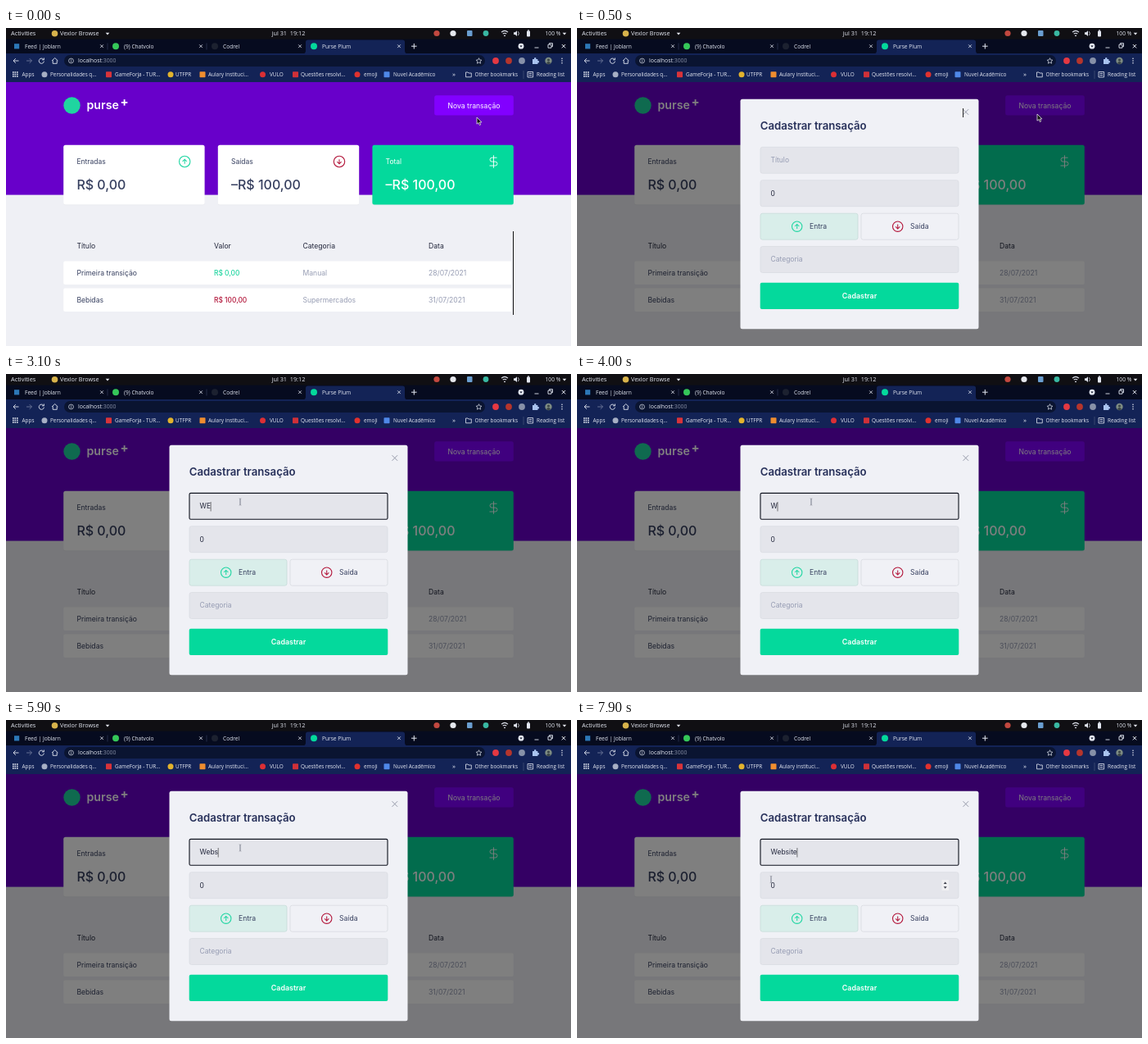
Animation, 690 px wide and 388 px high, one loop 8 s. Source, as an HTML page:

```html
<!DOCTYPE html>
<html lang="pt">
<head>
<meta charset="utf-8">
<title>Purse Plum</title>
<style>
html, body { margin: 0; width: 100%; height: 100%; overflow: hidden; background: #eff0f5; }
svg { display: block; width: 690px; height: 388px; }
text { white-space: pre; }
.ui { font-family: "Open Sans", "Noto Sans", sans-serif; }
.app { font-family: Inter, "Open Sans", sans-serif; }
</style>
</head>
<body>
<svg id="stage" viewBox="0 0 690 388" xmlns="http://www.w3.org/2000/svg"></svg>
<script>
const LOOP = 8000;
const INK = '#363f5f', DARK = '#22263b', MUTED = '#969cb3', GREEN = '#04d99c', RED = '#b3173b';
const LIGHT = '#e4e8f2', NAVY = '#132356', STRIP = '#060b1f';

const attrs = o => Object.entries(o).map(([k, v]) => ` ${k}="${v}"`).join('');
const rect = (x, y, w, h, fill, o = {}) =>
  `<rect x="${x}" y="${y}" width="${w}" height="${h}" fill="${fill}"${attrs(o)}/>`;
const circle = (x, y, r, fill, o = {}) => `<circle cx="${x}" cy="${y}" r="${r}" fill="${fill}"${attrs(o)}/>`;
const line = (d, stroke, width = 1, o = {}) =>
  `<path d="${d}" fill="none" stroke="${stroke}" stroke-width="${width}"${attrs(o)}/>`;
const shape = (d, fill, o = {}) => `<path d="${d}" fill="${fill}"${attrs(o)}/>`;
const text = (x, y, s, size, fill, o = {}) =>
  `<text x="${x}" y="${y}" font-size="${size}" fill="${fill}"${attrs(o)}>${s}</text>`;
const group = (body, o = {}) => `<g${attrs(o)}>${body}</g>`;
const cross = (x, y, r, color, width = 0.8) =>
  line(`M${x - r} ${y - r}l${2 * r} ${2 * r}m0 ${-2 * r}l${-2 * r} ${2 * r}`, color, width);
const dropdown = (x, y) => shape(`M${x - 2.3} ${y - 1}h4.6l-2.3 2.8z`, LIGHT);

function arrowIcon(x, y, up, r = 6.7) {
  const s = up ? -1 : 1, color = up ? '#22d6a3' : RED;
  return circle(x, y, r, 'none', { stroke: color, 'stroke-width': 1.1 }) +
    line(`M${x} ${y - 2.8 * s}v${5.6 * s}m-2.6 ${-2.6 * s}l2.6 ${2.6 * s}l2.6 ${-2.6 * s}`, color, 1.05);
}

function systemBar() {
  return rect(0, 0, 690, 14, '#100f13') +
    text(6, 9.3, 'Activities', 7.4, LIGHT) +
    circle(59.5, 6.7, 3.8, '#d8b34b') +
    text(66, 9.3, 'Vexlor Browse', 7.2, LIGHT) + dropdown(124, 6.7) +
    text(345, 9.3, 'jul 31&#160; 19:12', 7.3, LIGHT, { 'text-anchor': 'middle' }) +
    circle(526, 6.5, 3.6, '#c2483f') + circle(546, 6.5, 3.6, '#e6e8ee') +
    rect(563, 3, 6.5, 7, '#6a9ed0', { rx: 1 }) + circle(586, 6.5, 3.4, '#39b8a2') +
    line('M605 5.2q4-3.6 8 0M606.7 7.2q2.3-2 4.6 0', LIGHT, 1.1) + circle(609, 9.3, 0.9, LIGHT) +
    shape('M620 5.3h1.8l2.2-2v6.8l-2.2-2H620z', LIGHT) + line('M625.4 4.3q2 2.4 0 4.8', LIGHT, 0.8) +
    rect(636, 3.5, 4, 7, LIGHT, { rx: 0.8 }) + rect(637, 2.4, 2, 1.2, LIGHT) +
    text(658.5, 9.2, '100 %', 6.7, LIGHT) + dropdown(682, 6.7);
}

function tabStrip() {
  const tabs = [
    ['Feed | Joblarn', '#2c78b7'], ['(9) Chatvolo', '#35c759'],
    ['Codrel', '#1c2130'], ['Purse Plum', GREEN]
  ];
  return rect(0, 13.6, 690, 18, STRIP) +
    shape('M363 31.2q3 0 3-4V17q0-2.5 3-2.5h115q3 0 3 2.5v10.2q0 4 3 4z', NAVY) +
    tabs.map(([name, color], i) => {
      const x = 13 + 121 * i;
      return (i ? circle(x, 22.2, 4, color) : rect(x - 3, 19.2, 6.2, 6.2, color)) +
        text(x + 10, 24.6, name, 6.6, LIGHT) + cross(x + 104, 22.2, 1.9, LIGHT);
    }).join('') +
    line('M124 18.5v8M245 18.5v8', '#3a4566', 0.6) +
    line('M495 22.2h6.6m-3.3-3.3v6.6', LIGHT, 1) +
    circle(629, 22.2, 3.4, LIGHT) + shape('M627.4 21.4h3.2l-1.6 2z', STRIP) +
    line('M645.5 24h5M662 20.2h4v4h-4zM663.5 20v-1.4h4v4H666', LIGHT, 0.9) + cross(681, 22.2, 2.2, LIGHT, 1);
}

function toolbar() {
  const plain = [[598, '#e53842'], [614, '#b5352c'], [630, '#8791a8']];
  return rect(0, 31, 690, 35.5, NAVY) +
    line('M15.5 40h-6.5m2.8-2.8l-2.8 2.8l2.8 2.8', LIGHT, 0.9) +
    line('M25 40h6.5m-2.8-2.8l2.8 2.8l-2.8 2.8', '#6f7a9a', 0.9) +
    line('M45.7 38.2a3.1 3.1 0 1 0 .7 2.4M46.4 36.5v2.3h-2.4', LIGHT, 0.9) +
    line('M56 40l3.7-3.4l3.7 3.4M57.2 39.5v3.8h5v-3.8', LIGHT, 0.9) +
    rect(71, 33, 514, 14.1, '#0a1431', { rx: 7 }) +
    circle(79.5, 40, 2.9, 'none', { stroke: LIGHT, 'stroke-width': 0.7 }) +
    line('M79.5 39.4v2.2M79.5 38v.7', LIGHT, 0.7) +
    text(88, 42.4, 'localhost<tspan fill="#8991a8">:3000</tspan>', 6.9, LIGHT) +
    line('M577.5 36.7l1 2.2 2.4.3-1.8 1.6.5 2.4-2.1-1.2-2.1 1.2.5-2.4-1.8-1.6 2.4-.3z', LIGHT, 0.7) +
    plain.map(([x, c]) => circle(x, 40, 3.9, c)).join('') +
    shape('M643 38h2q-.4-2 1.2-2t1.2 2h2v2q1.7-.3 1.7 1.2t-1.7 1.2v1.6H643z', '#a9c3ef') +
    circle(662.5, 40, 4.2, '#7d8b82') + shape('M659.8 43.1q2.7-4 5.4 0-2.7 2.1-5.4 0z', '#3b4546') +
    circle(662.5, 39, 1.5, '#3b4546') +
    [37.3, 40, 42.7].map(y => circle(679, y, 0.8, LIGHT)).join('');
}

function bookmarks() {
  const items = [
    [47, 54, 'Personalidades q...', '#a6afc4'], [125.5, 133, 'GameForja - TUR...', '#d8333a'],
    [201, 207, 'UTFPR', '#e2b32d'], [240, 247, 'Aulary instituci...', '#ef8d2f'],
    [313.5, 322, 'VULO', '#dc2f35'], [353.5, 360, 'Questões resolvi...', '#cf3038'],
    [429, 437, 'emoji', '#e0312e'], [465, 473, 'Nuvel Acadêmico', '#4f88e8']
  ];
  let grid = '';
  for (let i = 0; i < 9; i++) grid += rect(8 + i % 3 * 2.5, 53.2 + Math.floor(i / 3) * 2.5, 1.6, 1.6, LIGHT);
  return grid + text(19.5, 59.3, 'Apps', 6.4, LIGHT) +
    items.map(([x, tx, s, c], i) => (i % 2 ? rect(x - 3.5, 53.2, 7, 7, c, { rx: 0.8 }) : circle(x, 56.7, 3.5, c)) +
      text(tx, 59.3, s, 6.4, LIGHT)).join('') +
    text(545, 59.3, '»', 8, LIGHT) +
    line('M561.5 54h2.5l1 1h3.3v4.8h-6.8z', LIGHT, 0.8) + text(572.5, 59.3, 'Other bookmarks', 6.4, LIGHT) +
    line('M632 52v10', '#526080', 0.6) +
    line('M637 53.5h6.6v6.5H637zM638.4 55.5h3.8m-3.8 2.2h3.8', LIGHT, 0.8) +
    text(648, 59.3, 'Reading list', 6.4, LIGHT);
}

function card(x, label, amount, accent) {
  const ink = accent ? '#fff' : INK;
  return rect(x, 143.2, 172.4, 73, '#000', { rx: 2.5, opacity: 0.04 }) +
    rect(x, 142.8, 172.4, 72.7, accent ? GREEN : '#fff', { rx: 2.5 }) +
    text(x + 16.2, 166, label, 8.5, ink) +
    text(x + 16.2, 197, amount, 16, ink, { 'font-weight': 500 });
}

function tableRow(y, title, amount, color, category, date) {
  return rect(70.2, y, 549.6, 28.5, '#fff', { rx: 2 }) +
    text(86.4, y + 17, title, 8.6, INK) +
    text(254, y + 17, amount, 8.4, color, { 'font-weight': 500 }) +
    text(362.5, y + 17, category, 8.6, MUTED) + text(516, y + 17, date, 8.6, MUTED);
}

function page() {
  const heads = [[86.4, 'Título'], [254, 'Valor'], [362.5, 'Categoria'], [516, 'Data']];
  return rect(0, 66, 690, 322, '#eff0f5') + rect(0, 66, 690, 137.6, '#6800ca') +
    circle(80.5, 94.5, 10.2, '#1fd5a0') +
    text(98.5, 98.7, 'purse', 14.2, '#fff', { 'font-weight': 600 }) +
    text(139.5, 94.7, '+', 15, '#fff', { 'font-weight': 700 }) +
    rect(523.2, 82.3, 96.6, 24.2, '#8200ff', { rx: 2.5, id: 'newButton' }) +
    text(571.5, 97.6, 'Nova transação', 8.6, '#fff', { 'text-anchor': 'middle' }) +
    card(70.2, 'Entradas', 'R$ 0,00') + arrowIcon(218.2, 163, true) +
    card(258.8, 'Saídas', '–R$ 100,00') + arrowIcon(407, 163, false) +
    card(447.4, 'Total', '–R$ 100,00', true) +
    line('M595.5 155.3v15.5M599.5 158.2h-6a2.4 2.4 0 0 0 0 4.9h4a2.4 2.4 0 0 1 0 4.9h-7', '#fff', 1, { opacity: 0.9 }) +
    heads.map(([x, s]) => text(x, 269, s, 8.6, DARK)).join('') +
    tableRow(284.5, 'Primeira transição', 'R$ 0,00', '#1fd5a0', 'Manual', '28/07/2021') +
    tableRow(317.5, 'Bebidas', 'R$ 100,00', RED, 'Supermercados', '31/07/2021') +
    group(rect(617, 248, 3, 102, '#eff0f5') + line('M619.5 248v102', '#111', 1), { id: 'edge' });
}

function modal() {
  const field = (y, label, color, id) =>
    rect(224, y, 242, 32, '#e4e5eb', { rx: 2.5, stroke: '#d5d7dd', 'stroke-width': 0.6 }) +
    text(236.5, y + 18.9, label, 8.5, color, { id });
  const choice = (x, label, up) =>
    rect(x, 226.2, 119, 32, up ? '#d9eeea' : 'none', { rx: 2.5, stroke: up ? '#c3d9d6' : '#d5d7dd', 'stroke-width': 0.7 }) +
    arrowIcon(x + 44.7, 242.2, up, 6.2) + text(x + 60, 245.2, label, 8.6, INK);
  return rect(0, 66, 690, 322, '#000', { opacity: 0.5 }) +
    rect(199.5, 86.8, 291, 280.5, '#f0f1f6', { rx: 2.5 }) +
    cross(474.8, 102.5, 3.3, '#969aaa', 1) +
    line('M471.5 98v11', '#111', 0.9, { id: 'tick' }) +
    text(223.7, 124.3, 'Cadastrar transação', 13.2, '#27305a', { 'font-weight': 600 }) +
    field(145.3, '', MUTED, 'title') + field(185.7, '0', DARK, 'amount') +
    choice(224, 'Entra', true) + choice(347, 'Saída', false) +
    field(266.5, 'Categoria', MUTED, 'category') +
    rect(223.7, 310.7, 242.6, 32.4, GREEN, { rx: 2 }) +
    text(345, 330, 'Cadastrar', 8.9, '#fff', { 'font-weight': 600, 'text-anchor': 'middle' }) +
    rect(224, 145.4, 242, 31.8, 'none', { rx: 1.5, stroke: '#111420', 'stroke-width': 1.1, id: 'ring' }) +
    line('M0 156v11.5', '#222', 0.6, { id: 'caret' }) +
    group(rect(445.5, 195, 8.5, 13, '#f0f0f2') +
      shape('M447.7 200h4l-2-2.4zM447.7 203.3h4l-2 2.4z', '#3c3f4a'), { id: 'spinner' });
}

function cursors() {
  const outline = { stroke: '#fff', 'stroke-width': 0.7 };
  return group(
    shape('M0 0v8.2l1.9-1.7 1.4 3 1.4-.6-1.4-2.9h2.6z', '#151515', { ...outline, id: 'arrow' }) +
    shape('M-.9 0q.9-.9 1.8 0v3.5l3 .7q.8.3.6 1.4l-.7 3.2H-.4l-2.6-3.4q.2-1.4 2.1-.2z', '#fff',
      { stroke: '#151515', 'stroke-width': 0.6, id: 'hand' }) +
    line('M-1.3-4.2q1.3 0 1.3 1v6.4q0 1-1.3 1M1.3-4.2q-1.3 0-1.3 1v6.4q0 1 1.3 1', '#666b78', 0.5, { id: 'beam' }),
    { id: 'cursor' });
}

const stage = document.getElementById('stage');
stage.innerHTML = group(systemBar() + tabStrip() + toolbar() + bookmarks(), { class: 'ui' }) +
  group(page() + group(modal(), { id: 'modal' }), { class: 'app' }) + cursors();

const el = {};
stage.querySelectorAll('[id]').forEach(node => { el[node.id] = node; });
const show = (node, on) => node.setAttribute('display', on ? 'inline' : 'none');

const OPEN = 500, FOCUS = 2100, BLINK = 500;
const path = [[100, 575, 109], [350, 573, 95], [400, 573, 95], [500, 562, 105], [1800, 286, 156], [7000, 286, 156], [7750, 237, 194.5]];
const typing = [
  [FOCUS, ''], [2600, 'W'], [3100, 'WE'], [3500, 'WEB'], [3800, 'WE'], [4000, 'W'], [4200, ''], [4300, 'W'],
  [4600, 'We'], [4900, 'Web'], [5900, 'Webs'], [6200, 'Websi'], [6400, 'Websit'], [6600, 'Website']
];

function pointer(t) {
  const next = path.findIndex(key => key[0] > t);
  if (next === 0) return path[0].slice(1);
  if (next < 0) return path[path.length - 1].slice(1);
  const [t0, x0, y0] = path[next - 1], [t1, x1, y1] = path[next];
  const u = (t - t0) / (t1 - t0), e = u * u * (3 - 2 * u);
  return [x0 + (x1 - x0) * e, y0 + (y1 - y0) * e];
}

function render(t) {
  const open = t >= OPEN, focused = t >= FOCUS;
  const [x, y] = pointer(t);
  const inside = (x0, y0, x1, y1) => x >= x0 && x <= x1 && y >= y0 && y <= y1;
  const hover = !open && inside(523, 82, 620, 107);
  const overAmount = open && inside(224, 186, 466, 218);
  const overField = overAmount || open && inside(224, 145, 466, 178);

  show(el.edge, t < 100);
  show(el.modal, open);
  show(el.tick, t < 600);
  show(el.ring, focused);
  show(el.spinner, overAmount);
  el.newButton.setAttribute('fill', hover ? '#7500e6' : '#8200ff');

  el.cursor.setAttribute('transform', `translate(${x} ${y})`);
  show(el.hand, hover);
  show(el.beam, overField);
  show(el.arrow, !hover && !overField);

  const [since, typed] = typing.filter(key => key[0] <= t).pop() || [0, ''];
  el.title.textContent = typed || 'Título';
  el.title.setAttribute('fill', typed ? DARK : MUTED);
  const caretOn = focused && Math.floor((t - since) / BLINK) % 2 === 0;
  show(el.caret, caretOn);
  if (caretOn) {
    const width = typed ? el.title.getComputedTextLength() : 0;
    el.caret.setAttribute('transform', `translate(${236.6 + width} 0)`);
  }
}

const start = performance.now();
function tick() {
  render((performance.now() - start) % LOOP);
  requestAnimationFrame(tick);
}
tick();
</script>
</body>
</html>
```
